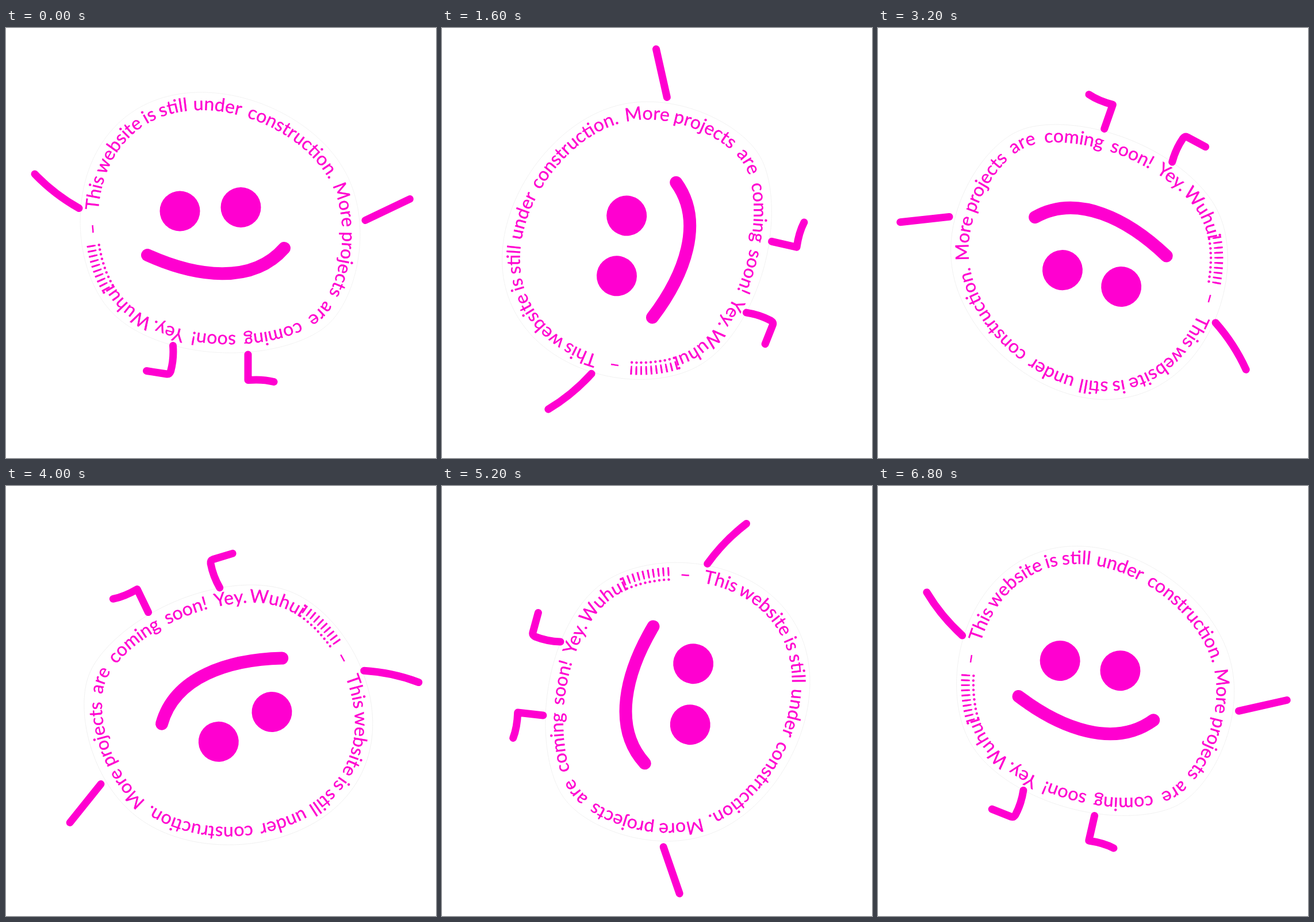
An HTML page for the animation above (7000 ms loop, 748 px wide and 748 px high).

```html
<!DOCTYPE html>
<html lang="en">
<head>
<meta charset="utf-8">
<title>Under construction</title>
<style>
  html, body { margin: 0; width: 100%; height: 100%; overflow: hidden; background: #fff; }
  svg { display: block; width: 100vw; height: 100vh; }
  text { font: 32px Lato, sans-serif; text-anchor: middle; stroke: #ff00d0; stroke-width: .35; }
  .limbs { stroke-width: 13; }
  .mouth { stroke-width: 22; }
  .limbs, .mouth { fill: none; stroke: #ff00d0; stroke-linecap: round; stroke-linejoin: round; }
</style>
</head>
<body>
<svg viewBox="0 0 748 748">
  <defs><path id="baseline"/></defs>
  <g id="guy" fill="#ff00d0">
    <path id="body" fill="#fff" stroke="#e9e9e9" stroke-width=".6"/>
    <g class="limbs">
      <path d="M50 254Q84 289.5 127 313.5"/>
      <path d="M625 334.5L702.5 297.5"/>
      <path d="M290.5 552.5C292 572 290 584 286.5 597Q284.5 602.5 280 602L244.5 596.5"/>
      <path d="M421 568V612.5Q447 610.5 466 615.5"/>
    </g>
    <circle cx="302.5" cy="318.5" r="35"/>
    <circle cx="408.5" cy="312" r="35"/>
    <path class="mouth" d="M246 395C330 433 428 447 484 383"/>
    <g id="words"></g>
  </g>
</svg>
<script>
const $ = id => document.getElementById(id);
const NS = 'http://www.w3.org/2000/svg';
const RAD = Math.PI / 180;

// Body shape as a support function: mean radius plus [cos, sin] harmonics.
const CENTER = [372.5, 338.5];
const RADIUS = 239.25;
const WAVES = [[-1.41, 5.15], [8.42, 9.24], [1.67, 3.67], [-4.25, -1.73], [-.26, -1.49]];
const INSET = 31;
const START = 182;

function edge(deg, inset) {
  const p = deg * RAD, c = Math.cos(p), s = Math.sin(p);
  let h = RADIUS - inset, dh = 0;
  WAVES.forEach(([a, b], i) => {
    const k = i + 1, ck = Math.cos(k * p), sk = Math.sin(k * p);
    h += a * ck + b * sk;
    dh += k * (b * ck - a * sk);
  });
  return [CENTER[0] + h * c - dh * s, CENTER[1] + h * s + dh * c];
}

const ring = inset => Array.from({ length: 721 }, (_, i) => edge(START + i / 2, inset));
const toPath = pts => 'M' + pts.map(p => p.map(v => v.toFixed(2)).join(' ')).join('L');

const line = ring(INSET);
$('body').setAttribute('d', toPath(ring(0)) + 'Z');
$('baseline').setAttribute('d', toPath(line));

// Distance along the baseline to the spot nearest (x, y).
function offsetAt(x, y) {
  let run = 0, best = Infinity, found = 0;
  line.forEach((p, i) => {
    if (i) run += Math.hypot(p[0] - line[i - 1][0], p[1] - line[i - 1][1]);
    const d = Math.hypot(p[0] - x, p[1] - y);
    if (d < best) { best = d; found = run; }
  });
  return found;
}

// Each word with its middle, and a letter pitch where it is set tight.
const WORDS = [
  ['This', 169, 289], ['website', 202.5, 210.5], ['is', 251, 157], ['still', 291.5, 146],
  ['under', 367, 147], ['construction.', 490.5, 211.5], ['More', 578.5, 310.5],
  ['projects', 573.5, 409], ['are', 537.5, 487], ['coming', 462.5, 519.5],
  ['soon!', 363.5, 526.5], ['Yey.', 287, 515], ['Wuhui', 218, 480],
  ['!!!!!!!!!!', 174, 413, 8.2], ['–', 164, 349]
];

for (const [word, x, y, pitch] of WORDS) {
  const text = document.createElementNS(NS, 'text');
  const run = document.createElementNS(NS, 'textPath');
  $('words').append(text);
  if (pitch) {
    text.textContent = word;
    const advance = text.getComputedTextLength() / word.length;
    text.style.letterSpacing = (pitch - advance).toFixed(2) + 'px';
    text.textContent = '';
  }
  run.setAttribute('href', '#baseline');
  run.setAttribute('startOffset', offsetAt(x, y).toFixed(2));
  run.textContent = word;
  text.append(run);
}

// 56 turn positions per loop, shown at five pictures a second.
const LOOP = 7000, HOLD = 200, TURNS = 56;
const t0 = performance.now();

function draw() {
  const t = Math.max(0, performance.now() - t0) % LOOP;
  const turn = Math.floor(Math.floor(t / HOLD) * HOLD * TURNS / LOOP);
  $('guy').setAttribute('transform', `rotate(${-360 * turn / TURNS} 374 374)`);
  requestAnimationFrame(draw);
}
draw();
</script>
</body>
</html>
```
